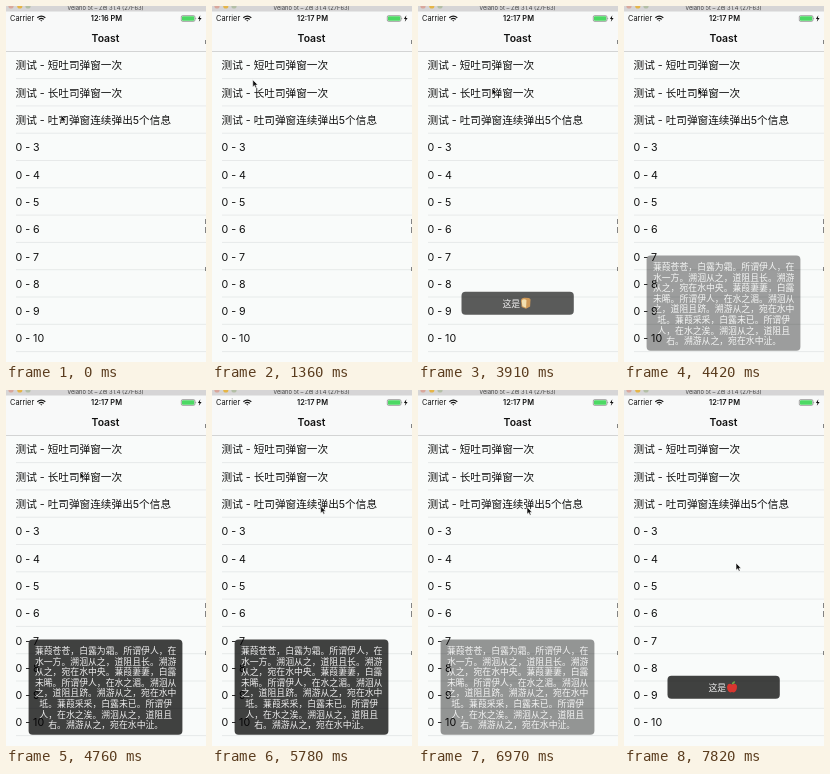
An HTML page for the animation above (7.99 s loop, 200 by 356 pixels).

```html
<!DOCTYPE html>
<html lang="zh-CN">
<head>
<meta charset="utf-8">
<title>Toast</title>
<style>
  html, body { margin: 0; width: 100%; height: 100%; overflow: hidden; background: #f9fbfa; }
  svg { display: block; width: 100vw; height: 100vh; }
  text { font-family: Inter, "Noto Sans CJK SC", "Noto Sans CJK", sans-serif; fill: #111; }
  .row { font-size: 10.65px; }
  .status { font-size: 7.4px; }
  .mid { text-anchor: middle; }
  .bold { font-weight: 600; }
  .toast rect { fill: #000; fill-opacity: .74; }
  .toast text { fill: #eee; font-size: 8.85px; }
</style>
</head>
<body>
<svg viewBox="0 0 200 356" preserveAspectRatio="none">
  <rect width="200" height="356" fill="#f9fbfa"/>
  <rect width="200" height="45" fill="#f8f9f9"/>
  <rect width="200" height="5.5" fill="#d6d5d6"/>
  <circle cx="5" cy="0" r="2.6" fill="#d9a79c"/>
  <circle cx="13.8" cy="0" r="2.6" fill="#e5b547"/>
  <circle cx="22" cy="0" r="2.6" fill="#b3bfa6"/>
  <text class="mid" x="99.5" y="4" style="font-size:5.8px;fill:#444">Velano 5t – Zel 31.4 (27F63)</text>

  <text class="status" x="4" y="15.3">Carrier</text>
  <g fill="none" stroke="#111" stroke-width="1.2">
    <path d="M31.3 11.7Q35.3 8.5 39.3 11.7M32.8 13.4Q35.3 11.4 37.8 13.4"/>
    <path d="M34.2 14.2h2.2l-1.1 1.2z" fill="#111" stroke="none"/>
  </g>
  <text class="status bold mid" id="clock" x="100.5" y="15.3"></text>
  <rect x="175.3" y="9.6" width="13.6" height="5.8" rx="1.3" fill="none" stroke="#555" stroke-width=".5"/>
  <rect x="176" y="10.3" width="12.2" height="4.4" rx=".7" fill="#4cd964"/>
  <path d="M189.6 11.5q1.3 1 0 2z" fill="#555"/>
  <path d="M194.3 9.3l-2.4 3.6h1.6l-.7 2.8 2.8-3.8h-1.7z" fill="#111"/>
  <text class="bold mid" x="99.5" y="36.2" style="font-size:10.4px">Toast</text>
  <path d="M0 45.5H200" stroke="#c3c5c5" stroke-width=".7"/>

  <g id="list"></g>
  <path d="M199.6 34v4M199.6 213v5M199.6 221v6M199.6 261v4" stroke="#555" stroke-width=".8"/>

  <g class="toast" id="bread">
    <rect x="43.5" y="285.8" width="112.3" height="23" rx="4"/>
    <text x="84.5" y="300.8">这是</text>
    <path d="M103 294.2q.4-2.8 4-2.5l3.7.4q2.4.6 1.7 3.1l-.3 5.4-4.1 2.1-4.4-1.8z" fill="#c98a3d"/>
    <path d="M103.7 295q.1-2 2.5-1.8 3 0 2.2 2.5l-.3 6-3.7-1.5z" fill="#f3dca6"/>
  </g>
  <g class="toast" id="poem">
    <rect x="22.6" y="249.5" width="153.8" height="95.3" rx="4"/>
  </g>
  <g class="toast" id="fruit">
    <rect x="43.5" y="285.8" width="112.3" height="23" rx="4"/>
    <text x="84.5" y="300.8">这是</text>
    <path d="M108 294.5q4.5-2 5 2.2-.2 4.7-3.2 5.8l-1.8-.4-1.8.4q-3-1.2-3.2-5.8.6-4.2 5-2.2z" fill="#d8362f"/>
    <path d="M107.8 294.4q.2-3 3.3-3.2-.2 2.8-3.3 3.2z" fill="#6da544"/>
  </g>
  <path id="cursor" d="M0 0V7.2L1.7 5.7 2.9 8.3 4.1 7.7 3 5.2H5.2Z" fill="#111" stroke="#fff" stroke-width=".6"/>
</svg>
<script>
const LOOP = 7990, STEP = 170;
const byId = id => document.getElementById(id);

function add(parent, tag, attrs, text = '') {
  const node = document.createElementNS('http://www.w3.org/2000/svg', tag);
  for (const key in attrs) node.setAttribute(key, attrs[key]);
  node.textContent = text;
  parent.append(node);
}

const rows = ['测试 - 短吐司弹窗一次', '测试 - 长吐司弹窗一次', '测试 - 吐司弹窗连续弹出5个信息'];
for (let i = 3; i <= 10; i++) rows.push('0 - ' + i);
rows.forEach((label, i) => {
  const top = 45.3 + i * 27.3;
  add(byId('list'), 'text', { class: 'row', x: 9.5, y: top + 18.1 }, label);
  add(byId('list'), 'path', { d: `M10 ${top + 27.3}H200`, stroke: '#e0e2e2', 'stroke-width': .7 });
});

const verses = [
  '蒹葭苍苍，白露为霜。所谓伊人，在',
  '水一方。溯洄从之，道阻且长。溯游',
  '从之，宛在水中央。蒹葭萋萋，白露',
  '未晞。所谓伊人，在水之湄。溯洄从',
  '之，道阻且跻。溯游从之，宛在水中',
  '坻。蒹葭采采，白露未已。所谓伊',
  '人，在水之涘。溯洄从之，道阻且',
  '右。溯游从之，宛在水中沚。'
];
verses.forEach((line, i) =>
  add(byId('poem'), 'text', { class: 'mid', x: 99.7, y: 264 + i * 10.6 }, line));

// Each key is [time, ...values]; values are interpolated linearly.
function sample(keys, t) {
  const next = keys.findIndex(key => key[0] > t);
  if (next === 0) return keys[0].slice(1);
  if (next < 0) return keys[keys.length - 1].slice(1);
  const a = keys[next - 1], b = keys[next];
  const p = (t - a[0]) / (b[0] - a[0]);
  return a.slice(1).map((v, i) => v + (b[i + 1] - v) * p);
}

const fades = {
  bread: [[2040, 0], [2380, 1], [3740, 1], [3910, .86], [4080, .3], [4250, 0]],
  poem: [[4250, 0], [4590, 1], [6800, 1], [6970, .55], [7140, 0]],
  fruit: [[7310, 0], [7650, 1]]
};
const pointer = [
  [0, 55, 109], [850, 55, 109], [1530, 36, 62], [2040, 36, 62], [2380, 34, 88],
  [2890, 74, 82], [5100, 74, 82], [6120, 126, 133], [6630, 126, 133],
  [6970, 109, 117], [7310, 109, 117], [7650, 112, 173]
];

function draw(now) {
  const t = Math.floor((now % LOOP) / STEP) * STEP;
  for (const id in fades) byId(id).setAttribute('opacity', sample(fades[id], t)[0]);
  byId('cursor').setAttribute('transform', `translate(${sample(pointer, t)})`);
  byId('clock').textContent = t < 1190 ? '12:16 PM' : '12:17 PM';
}

let start;
function tick(now) {
  start ??= now;
  draw(now - start);
  requestAnimationFrame(tick);
}
draw(0);
requestAnimationFrame(tick);
</script>
</body>
</html>
```
